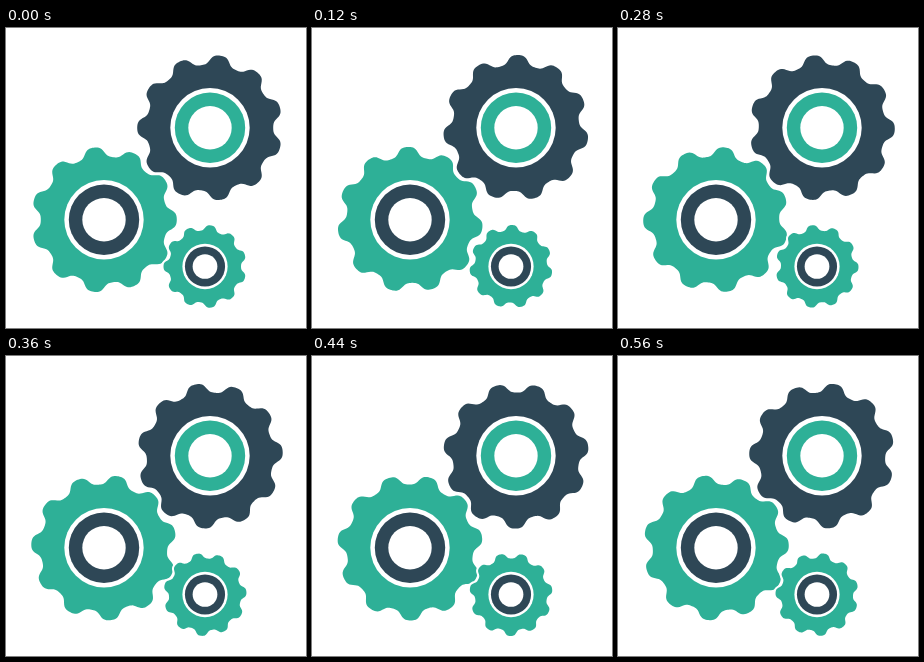
These frames come from a looping animation (300x300 px, 0.6 s). An HTML page:

```html
<!DOCTYPE html>
<html lang="en">
<head>
<meta charset="utf-8">
<title>Gears</title>
<style>
  html, body { margin: 0; width: 100%; height: 100%; overflow: hidden; background: #fff; }
  svg { display: block; width: 100vw; height: 100vh; }
</style>
</head>
<body>
<svg viewBox="0 0 300 300"></svg>
<script>
const DARK = '#2e4756', GREEN = '#2eb097';
const TEETH = 11, LOOP = 600, STEP = 40, UPRIGHT = 150;
const GEARS = [
  { x: 98, y: 191.7, scale: 1, body: GREEN, ring: DARK, turn: 1 },
  { x: 204, y: 99.8, scale: 1, body: DARK, ring: GREEN, turn: -1 },
  { x: 199, y: 238.5, scale: 0.57, body: GREEN, ring: DARK, turn: -1 }
];

// Rounded teeth: a softened square wave wrapped around a circle.
function gearPath() {
  const points = [], count = TEETH * 32;
  for (let i = 0; i < count; i++) {
    const a = i / count * 2 * Math.PI;
    const r = 68 + 4.8 * Math.tanh(1.5 * Math.cos(TEETH * a)) / Math.tanh(1.5);
    points.push((r * Math.sin(a)).toFixed(2) + ' ' + (-r * Math.cos(a)).toFixed(2));
  }
  return 'M' + points.join('L') + 'Z';
}

const shape = gearPath();
const svg = document.querySelector('svg');
svg.innerHTML = GEARS.map(g => `
  <g transform="translate(${g.x} ${g.y}) scale(${g.scale})">
    <path d="${shape}" fill="${g.body}" stroke="#fff" stroke-width="${4 / g.scale}" paint-order="stroke"/>
    <circle r="39.7" fill="#fff"/>
    <circle r="35.2" fill="${g.ring}"/>
    <circle r="21.7" fill="#fff"/>
  </g>`).join('');
const wheels = svg.querySelectorAll('path');

function draw() {
  const time = Math.floor(performance.now() % LOOP / STEP) * STEP;
  const angle = (time - UPRIGHT) / LOOP * 360 / TEETH;
  GEARS.forEach((g, i) => wheels[i].setAttribute('transform', `rotate(${g.turn * angle})`));
  requestAnimationFrame(draw);
}
draw();
</script>
</body>
</html>
```
